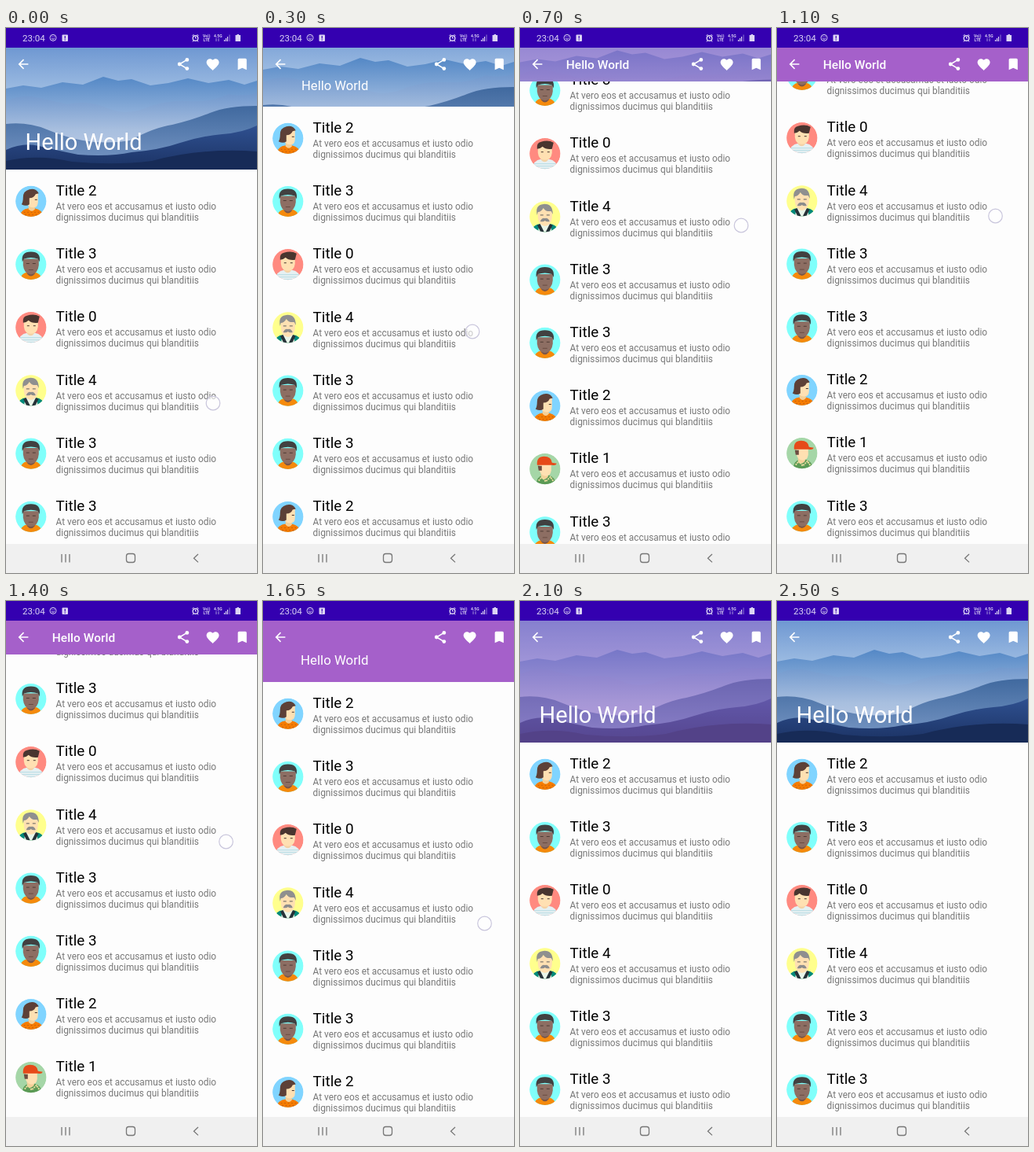
Recreate the animation shown at these times as an HTML page. Size 320 px wide and 693 px high, loop 2.55 s.

```html
<!DOCTYPE html>
<html lang="en">
<head>
<meta charset="utf-8">
<title>Collapsing toolbar</title>
<style>
  html, body { margin: 0; width: 100%; height: 100%; overflow: hidden; background: #fdfdfd; }
  svg { display: block; width: 100vw; height: 100vh; font-family: Roboto, sans-serif; }
  .heading { font-size: 18.9px; fill: #000; }
  .body { font-size: 11.87px; fill: #777; }
  .tiny { font-size: 5px; font-weight: 700; }
</style>
</head>
<body>
<svg viewBox="0 0 320 693">
  <defs>
    <clipPath id="disc"><circle r="19.6"/></clipPath>
    <clipPath id="headerClip"><rect id="headerBox" y="25" width="320" height="155"/></clipPath>
    <linearGradient id="sky" x2="0" y2="1">
      <stop stop-color="#6f98d2"/><stop offset=".35" stop-color="#9dbce2"/><stop offset="1" stop-color="#c3d2e8"/>
    </linearGradient>
    <linearGradient id="far" x2="0" y2="1">
      <stop stop-color="#5488c6"/><stop offset=".6" stop-color="#8fb0da"/><stop offset="1" stop-color="#b9cbe5"/>
    </linearGradient>
    <linearGradient id="middle" x2="0" y2="1">
      <stop stop-color="#6f97cd"/><stop offset=".7" stop-color="#a8bfdf"/><stop offset="1" stop-color="#b4c7e3"/>
    </linearGradient>
    <linearGradient id="near" x2="0" y2="1">
      <stop stop-color="#40699f"/><stop offset="1" stop-color="#7d9bc8"/>
    </linearGradient>
    <linearGradient id="front" x2="0" y2="1">
      <stop stop-color="#2f5090"/><stop offset="1" stop-color="#1b3263"/>
    </linearGradient>

    <g id="avatar0" clip-path="url(#disc)">
      <circle r="20" fill="#ff8a80"/>
      <path d="M-16 20q1-12 11-13h10q10 1 11 13z" fill="#e6f0f2"/>
      <path d="M-14 13h28M-15 16h30M-15 19h30" stroke="#b5dce4"/>
      <path d="M-5 2h9v6q-4 5-9 0z" fill="#f4d2a6"/>
      <path d="M-9-9h18v8q-1 9-9 9t-9-9z" fill="#ffe0b2"/>
      <path d="M-10-6q-1-8 5-9 9-3 16 1l-2 8q-8 1-12-3-3 3-7 3z" fill="#49352f"/>
      <path d="M-5-2h3M3-2h3" stroke="#49352f"/>
    </g>
    <g id="avatar1" clip-path="url(#disc)">
      <circle r="20" fill="#a5d6a7"/>
      <path d="M-11 20q0-10 8-12h8q8 2 9 12z" fill="#5b9a55"/>
      <path d="M-5 2h9v8q-5 6-9 1z" fill="#f4cf98"/>
      <path d="M-7-7h15v9q-1 7-7 7-8-1-8-10z" fill="#ffe0b2"/>
      <path d="M-9-4h5v6h-4z" fill="#6d4c41"/>
      <path d="M-10-5q-1-11 9-11 9 0 10 8l6 1q-1 3-6 2z" fill="#e64a19"/>
      <path d="M-8 15l4-5 5 6 6-6 4 6" fill="none" stroke="#e8dca0" stroke-width="2" stroke-dasharray="2 1"/>
    </g>
    <g id="avatar2" clip-path="url(#disc)">
      <circle r="20" fill="#80d4ff"/>
      <path d="M-15 20q2-10 12-11h8q10 2 11 11z" fill="#f57c00"/>
      <path d="M-9 14h20M-12 17h24" stroke="#bf5a14" stroke-dasharray="1.5 3"/>
      <path d="M-3 2h8v8q-4 5-8 0z" fill="#f4cf98"/>
      <path d="M-5-11h14v12q0 7-6 7-8 0-8-8z" fill="#ffe0b2"/>
      <path d="M10-10q-4-7-12-5-8 2-8 10 0 6-2 9 6 3 10 0v-8q6 0 8-5z" fill="#5d4037"/>
      <path d="M5-2h3" stroke="#49352f"/>
    </g>
    <g id="avatar3" clip-path="url(#disc)">
      <circle r="20" fill="#80fffb"/>
      <path d="M-14 20q1-8 9-10h10q8 2 9 10z" fill="#f58a0c"/>
      <path d="M-5 4h10v8q-5 6-10 0z" fill="#795548"/>
      <path d="M-10-7h20v8q-1 11-10 12-9-1-10-12z" fill="#8d6e63"/>
      <path d="M-11-3q-2-13 11-13t11 13l-2-4q-9-3-18 0z" fill="#414141"/>
      <path d="M-6-1h4M2-1h4" stroke="#4e3b35"/>
      <path d="M-3 7h6" stroke="#694c42"/>
    </g>
    <g id="avatar4" clip-path="url(#disc)">
      <circle r="20" fill="#ffff8d"/>
      <path d="M-18 20q2-10 12-11H6q10 1 12 11z" fill="#00897b"/>
      <path d="M-7 9H7l2 11H-9z" fill="#e8f5e9"/>
      <path d="M-8 10l5 10M8 10l-5 10" stroke="#263238" stroke-width="4"/>
      <path d="M-9-10H9V1q-1 10-9 11Q-8 11-9 1z" fill="#ffe0b2"/>
      <path d="M-10-2q-3-13 8-14 12-1 12 13l-2-4q-7 1-10-4-3 5-7 5z" fill="#8f8f8f"/>
      <path d="M-6 6q2-5 6-4 4-1 6 4-4 1-6-1-2 2-6 1z" fill="#8c8c8c"/>
      <path d="M-6-2h4M2-2h4" stroke="#5f5f5f"/>
    </g>
  </defs>

  <rect width="320" height="693" fill="#fdfdfd"/>
  <g id="list"></g>

  <g clip-path="url(#headerClip)">
    <g id="photo">
      <rect y="25" width="320" height="156" fill="url(#sky)"/>
      <path fill="url(#far)" d="M0 77L22 73 45 76 72 69 98 72 124 62 143 67 160 65 184 73 207 70 232 64 258 70 284 66 304 72 320 67V140H0z"/>
      <path fill="url(#middle)" d="M0 93Q20 84 38 88T78 97Q106 91 130 102T182 100Q208 91 234 93T284 84Q305 88 320 82V150H0z"/>
      <path fill="url(#near)" d="M0 122Q28 119 52 129T98 143Q128 148 158 143 190 126 212 123 238 117 260 108T320 99V181H0z"/>
      <path fill="url(#front)" d="M0 155Q22 145 42 150T92 161Q132 164 160 158 196 155 222 146 250 137 276 135T320 124V181H0z"/>
      <path fill="#172b57" d="M0 169Q40 160 84 170 140 175 186 169 250 152 320 157V181H0z"/>
    </g>
    <rect id="scrim" y="25" width="320" height="156" fill="#a560ca"/>
  </g>
  <text id="title" fill="#fff">Hello World</text>

  <g id="toolbar" fill="#fff">
    <path transform="translate(12.4 36.4) scale(.8)" d="M20 11H7.8l5.6-5.6L12 4l-8 8 8 8 1.4-1.4L7.8 13H20z"/>
    <g transform="translate(216.4 36.4) scale(.8)">
      <path d="M18 5L6 12l12 7" fill="none" stroke="#fff" stroke-width="2"/>
      <circle cx="18" cy="5" r="3"/><circle cx="6" cy="12" r="3"/><circle cx="18" cy="19" r="3"/>
    </g>
    <path transform="translate(254 36.8) scale(.8)" d="M12 21.35l-1.45-1.32C5.4 15.36 2 12.28 2 8.5 2 5.42 4.42 3 7.5 3c1.74 0 3.41.81 4.5 2.09C13.09 3.81 14.76 3 16.5 3 19.58 3 22 5.42 22 8.5c0 3.78-3.4 6.86-8.55 11.54z"/>
    <path transform="translate(291.6 36.4) scale(.8)" d="M17 3H7c-1.1 0-2 .9-2 2v16l7-3 7 3V5c0-1.1-.9-2-2-2z"/>
  </g>

  <rect width="320" height="25" fill="#3400b0"/>
  <g id="status" fill="#dcd4f4">
    <text x="21" y="17" font-size="11.6">23:04</text>
    <g fill="none" stroke="#dcd4f4">
      <circle cx="60" cy="12.4" r="4"/>
      <path d="M58 13q2 3 4 0M58.3 11h1M60.8 11h1"/>
      <circle cx="241.500" cy="13" r="3.300" stroke-width="1.400"/>
      <path d="M237.500 10l2-2M245.500 10l-2-2M241.500 11v2h1.500M239 16l-1 1.500M244 16l1 1.500"/>
    </g>
    <rect x="71.500" y="8.500" width="7.500" height="8.500" rx="1"/>
    <path d="M75.250 10v3.500M75.250 14.500v1.200" stroke="#3400b0" stroke-width="1.200"/>
    <g class="tiny">
      <text x="251" y="11.500">Vo))</text><text x="251.500" y="17">LTE</text><text x="265" y="11.500">4.5G</text>
    </g>
    <path d="M268 13v4M271 13v4" stroke="#a394dc"/>
    <path d="M278.500 17v-2M280.500 17v-4M282.500 17v-6" stroke="#dcd4f4" stroke-width="1.200"/>
    <path d="M285 17V8.500" stroke="#8068cc" stroke-width="1.200"/>
    <path d="M292.500 9h2V8h2.500v1h2v8h-6.500z"/>
  </g>

  <rect y="656" width="320" height="37" fill="#f0f0f0"/>
  <g fill="none" stroke="#777" stroke-width="1.300">
    <path d="M71 669v10.500M76 669v10.500M81 669v10.500M245 669l-5.500 5.200 5.500 5.200"/>
    <rect x="153.500" y="668.500" width="11" height="11" rx="3"/>
  </g>
  <circle id="touch" r="8.800" fill="#fff" fill-opacity=".6" stroke="#c9c6dc" stroke-width="1.200"/>
</svg>
<script>
const LOOP = 2550, STEP = 50, COLLAPSE = 112;
const $ = id => document.getElementById(id);
const clamp = x => Math.min(1, Math.max(0, x));

$('list').innerHTML = [2, 3, 0, 4, 3, 3, 2, 1, 3, 2].map((kind, i) => `
  <g transform="translate(0 ${i * 80.2})">
    <use href="#avatar${kind}" x="31.8" y="220.3"/>
    <text class="heading" x="63.600" y="213">Title ${kind}</text>
    <text class="body" x="63.600" y="231">At vero eos et accusamus et iusto odio</text>
    <text class="body" x="63.600" y="245">dignissimos ducimus qui blanditiis</text>
  </g>`).join('');

// Each track is a list of [time, value] knots.
const scrollTrack = [[0, 0], [50, 1], [300, 80], [520, 173], [700, 221], [900, 238], [1100, 241], [1200, 235], [1400, 176], [1650, 77], [1850, 4], [1900, 0]];
const fingerX = [[0, 264], [300, 267], [700, 282], [1100, 278.5], [1650, 282.5], [1900, 283]];
const fingerY = [[0, 477], [50, 471], [300, 386], [520, 300], [700, 251], [900, 241], [1100, 239], [1200, 246], [1400, 306], [1650, 410], [1900, 490]];

// Cubic interpolation that does not overshoot its knots.
function sample(track, t) {
  const last = track.length - 1;
  if (t >= track[last][0]) return track[last][1];
  const slope = i => i < 0 || i >= last ? 0 : (track[i + 1][1] - track[i][1]) / (track[i + 1][0] - track[i][0]);
  const tangent = i => {
    const a = slope(i - 1), b = slope(i);
    return a * b > 0 ? 2 * a * b / (a + b) : 0;
  };
  const i = track.findIndex((_, k) => t < track[k + 1][0]);
  const [t0, v0] = track[i], [t1, v1] = track[i + 1];
  const d = t1 - t0, u = (t - t0) / d, ease = u * u * (3 - 2 * u);
  return v0 + (v1 - v0) * ease + d * u * (1 - u) * ((1 - u) * tangent(i) - u * tangent(i + 1));
}

function draw(t) {
  const scroll = sample(scrollTrack, t);
  const shift = Math.min(scroll, COLLAPSE);
  const f = shift / COLLAPSE;
  $('list').setAttribute('transform', `translate(0 ${-scroll})`);
  $('headerBox').setAttribute('height', 155 - shift);
  $('photo').setAttribute('transform', `translate(0 ${-0.3 * shift})`);

  const shown = clamp((t - 330) / 600) ** 1.5;
  const hidden = clamp((t - 1700) / 700);
  $('scrim').setAttribute('opacity', shown * (1 - hidden));

  const title = $('title');
  title.setAttribute('x', 24.6 + 34.2 * f);
  title.setAttribute('y', 155 - 103.3 * f - 12 * f * (1 - f));
  title.style.fontSize = 15.5 + 13.5 * (1 - f) ** 2 + 'px';
  title.style.fontWeight = f === 1 ? 500 : 400;

  $('touch').setAttribute('transform', `translate(${sample(fingerX, t)} ${sample(fingerY, t)})`);
  $('touch').setAttribute('visibility', t < 1900 ? 'visible' : 'hidden');
}

const start = performance.now();
function tick() {
  const t = (performance.now() - start) % LOOP;
  draw(Math.floor(t / STEP) * STEP);
  requestAnimationFrame(tick);
}
tick();
</script>
</body>
</html>
```
